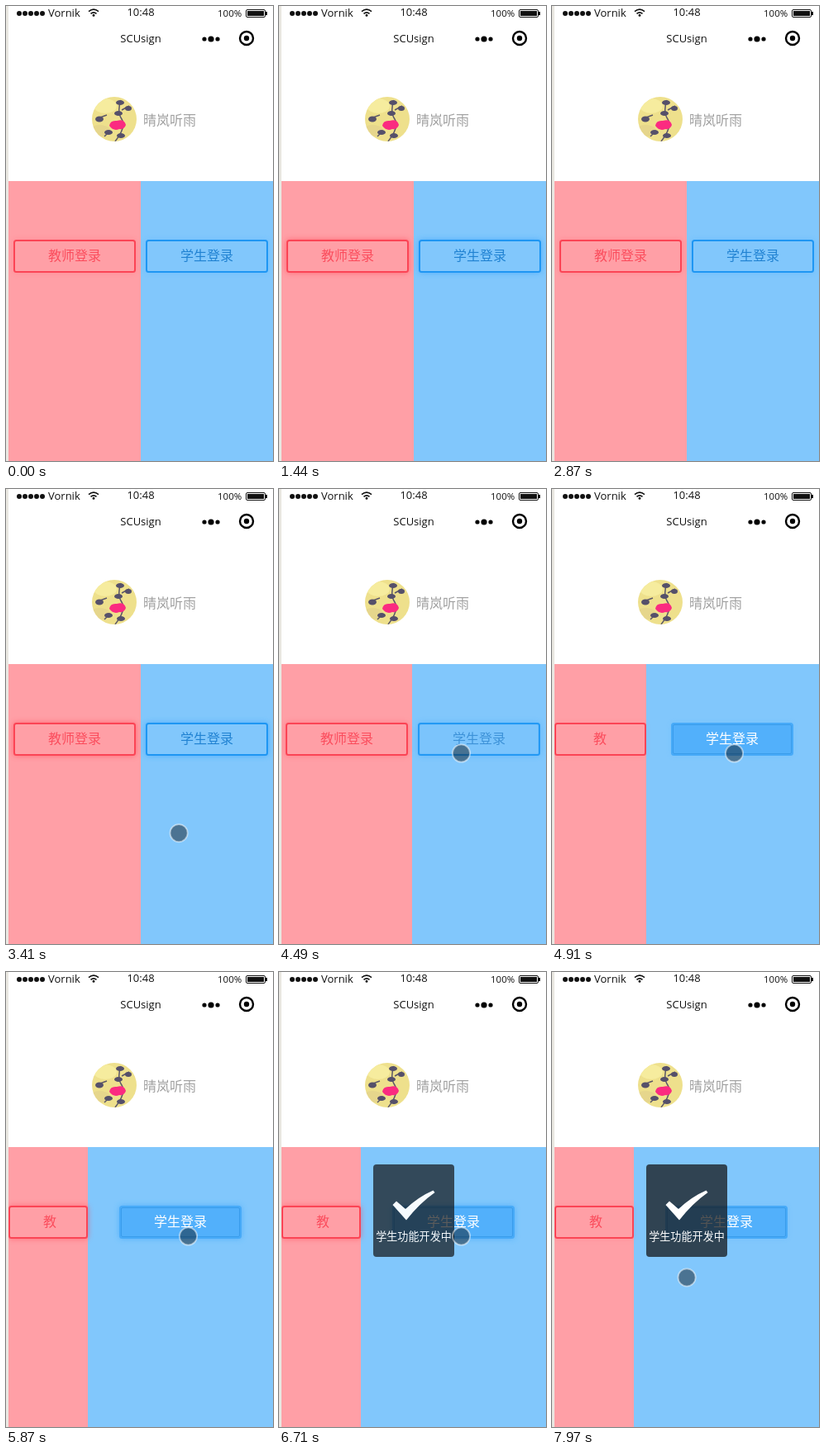
These frames come from a looping animation (323x551 px, 8 s). An HTML page:

```html
<!DOCTYPE html>
<html lang="zh">
<head>
<meta charset="utf-8">
<title>SCUsign</title>
<style>
  html, body { margin: 0; width: 100%; height: 100%; overflow: hidden; background: #fff; }
  svg { display: block; width: 323px; height: 551px; }
  text { font-family: "Open Sans", "Noto Sans CJK SC", "Noto Sans CJK", sans-serif; fill: #111; }
  .cjk { font-family: "Noto Sans CJK SC", "Noto Sans CJK", sans-serif; font-weight: 300; }
  .label { font-size: 16px; text-anchor: middle; }
</style>
</head>
<body>
<svg viewBox="0 0 323 551">
  <defs>
    <filter id="blur" x="-20%" y="-60%" width="140%" height="220%"><feGaussianBlur stdDeviation="3.6"/></filter>
    <clipPath id="round"><circle cx="131" cy="137" r="27"/></clipPath>
  </defs>
  <rect width="323" height="551" fill="#fff"/>

  <g id="status">
    <g id="signal" fill="#111"></g>
    <text x="51" y="12.5" font-size="13">Vornik</text>
    <g fill="none" stroke="#111" stroke-width="1.6">
      <path d="M100 6.7Q106 1.7 112 6.7M102.5 9.3Q106 6.3 109.5 9.3"/>
      <circle cx="106" cy="11.3" r=".7"/>
    </g>
    <text x="163" y="12" font-size="13" text-anchor="middle">10:48</text>
    <text x="256" y="13" font-size="11.5">100%</text>
    <rect x="290.5" y="4.5" width="23" height="9" rx="1.5" fill="none" stroke="#111"/>
    <rect x="292" y="6" width="20" height="6" fill="#111"/>
    <rect x="314" y="7" width="2" height="4" fill="#111"/>
  </g>

  <text x="163" y="44" font-size="13" text-anchor="middle">SCUsign</text>
  <circle cx="240" cy="40" r="2.6"/>
  <circle cx="248" cy="40" r="3.6"/>
  <circle cx="256" cy="40" r="2.6"/>
  <circle cx="291" cy="39" r="8" fill="none" stroke="#000" stroke-width="2.4"/>
  <circle cx="291" cy="39" r="3.2"/>

  <g clip-path="url(#round)">
    <rect x="104" y="110" width="54" height="54" fill="#eee08c"/>
    <ellipse cx="120" cy="121" rx="14" ry="9" fill="#f6ec9e"/>
    <ellipse cx="113" cy="151" rx="13" ry="7" fill="#e6d68c"/>
    <path d="M139 114Q134 128 140 137T132 164M140 126L149 121M122 132L111 136M126 151L119 158" fill="none" stroke="#5d5868" stroke-width="1.5"/>
    <g fill="#55506a">
      <ellipse cx="138" cy="117" rx="5" ry="3"/>
      <ellipse cx="148" cy="124" rx="4" ry="3"/>
      <ellipse cx="113" cy="137" rx="5" ry="3.5"/>
      <ellipse cx="136" cy="130" rx="5" ry="3"/>
      <ellipse cx="124" cy="153" rx="5" ry="3"/>
      <ellipse cx="139" cy="157" rx="5" ry="3"/>
    </g>
    <path d="M125 145Q126 138 134 139Q143 136 145 144Q143 150 137 149Q130 152 125 145Z" fill="#fb2b80"/>
  </g>
  <text class="cjk" x="166" y="143.5" font-size="16" style="fill:#a0a0a0">晴岚听雨</text>

  <rect x="3" y="212" width="320" height="339" fill="#ff9fa6"/>
  <rect id="rightColumn" y="212" height="339" fill="#81c7fc"/>
  <g id="buttons"></g>
  <rect width="3" height="551" fill="#e9e7e1"/>

  <g id="toast">
    <rect x="114" y="233" width="98" height="112" rx="4" fill="#111" fill-opacity=".72"/>
    <path d="M137.5 282L142 277.5L153 287Q169 272 186.5 264.5L188.5 267Q170 280 154 300.5Z" fill="#fff"/>
    <text class="cjk" x="163" y="325" font-size="13.1" text-anchor="middle" style="fill:#fff">学生功能开发中</text>
  </g>
  <circle id="cursor" r="10.6" fill="#000" fill-opacity=".42" stroke="#fff" stroke-opacity=".5" stroke-width="1.8"/>
</svg>

<script>
const LOOP = 8000, LEFT = 3, RIGHT = 323, PADDING = 42, LETTER = 16;
const PINK = [255, 159, 166], SKY = [129, 199, 252];
const byId = id => document.getElementById(id);
const clamp = x => Math.min(1, Math.max(0, x));
const mix = (a, b, p) => a + (b - a) * p;
const mixColor = (a, b, p) => `rgb(${a.map((v, i) => Math.round(mix(v, b[i], p)))})`;

function add(parent, tag, attrs) {
  const node = document.createElementNS('http://www.w3.org/2000/svg', tag);
  set(node, attrs);
  return parent.appendChild(node);
}
function set(node, attrs) {
  for (const key in attrs) node.setAttribute(key, attrs[key]);
}

// CSS "ease": cubic-bezier(.25, .1, .25, 1)
function ease(x) {
  x = clamp(x);
  let lo = 0, hi = 1;
  const curve = (s, a, b) => 3 * a * s * (1 - s) ** 2 + 3 * b * s * s * (1 - s) + s ** 3;
  for (let i = 0; i < 24; i++) {
    const mid = (lo + hi) / 2;
    if (curve(mid, .25, .25) < x) lo = mid; else hi = mid;
  }
  return curve(lo, .1, 1);
}
const progress = (t, start, length) => ease((t - start) / length);

// The frame is filled so that the glow shows only around it.
function makeButton(label, glowColor) {
  const group = add(byId('buttons'), 'g', {});
  return {
    label,
    glow: add(group, 'rect', { y: 283, height: 40, rx: 3, fill: glowColor, filter: 'url(#blur)' }),
    frame: add(group, 'rect', { y: 284, height: 38, rx: 2.5, 'stroke-width': 2 }),
    line: add(group, 'rect', { y: 285.5, height: 35, rx: 1.5, fill: 'none', stroke: '#399ceb', opacity: 0 }),
    text: add(group, 'text', { class: 'cjk label', y: 308 }),
  };
}

const teacher = makeButton('教师登录', '#ff4555');
const student = makeButton('学生登录', '#2b9df8');
for (let i = 0; i < 5; i++) add(byId('signal'), 'circle', { cx: 16 + 7 * i, cy: 9, r: 3 });

// Buttons shrink with their column; the label wraps and only its first line shows.
function placeButton(button, from, to) {
  const width = Math.min(148, to - from);
  const center = Math.floor((from + to) / 2);
  const x = width < 148 ? from : center - width / 2;
  const letters = Math.max(1, Math.min(4, Math.floor((width - 2 * PADDING) / LETTER)));
  set(button.glow, { x, width });
  set(button.frame, { x: x + 1, width: width - 2 });
  set(button.line, { x: x + 2.5, width: width - 5 });
  set(button.text, { x: Math.max(center, x + PADDING + letters * LETTER / 2) });
  const shown = button.label.slice(0, letters);
  if (button.text.textContent !== shown) button.text.textContent = shown;
}

const glowSteps = [
  [0, .3], [60, .4], [240, .9], [1610, .65], [2030, .2], [2870, .35],
  [3050, .9], [4490, .55], [4850, .15], [5690, .3], [5870, .8], [7370, .5], [7790, .2],
];
const glowAt = t => glowSteps.filter(([time]) => time <= t).pop()[1];

// start, end, from, to
const moves = [
  [3020, 3490, [178, 545], [210, 413]],
  [3660, 3950, [210, 413], [220.5, 320]],
  [7740, 7980, [220.5, 320], [163, 370]],
];
function cursorAt(t) {
  const [start, end, from, to] = moves.filter(move => move[0] <= t).pop() || moves[0];
  const p = 1 - (1 - clamp((t - start) / (end - start))) ** 2;
  return from.map((v, i) => mix(v, to[i], p));
}

function render(t) {
  const split = Math.floor(LEFT + mix(160, 96, progress(t, 4450, 1000)));
  const hover = progress(t, 4440, 420);
  const glow = glowAt(t);

  set(byId('rightColumn'), { x: split, width: RIGHT - split });
  placeButton(teacher, LEFT, split);
  placeButton(student, split, RIGHT);

  set(teacher.frame, { stroke: '#fb4455', fill: mixColor(PINK, PINK, 0) });
  teacher.text.style.fill = '#fb4d5d';
  set(teacher.glow, { opacity: glow * .7 });

  set(student.frame, {
    stroke: mixColor([30, 150, 243], [71, 170, 248], hover),
    fill: mixColor(SKY, [82, 176, 251], hover),
  });
  set(student.line, { opacity: hover });
  student.text.style.fill = mixColor([32, 130, 210], [255, 255, 255], hover);
  set(student.glow, { opacity: glow * .65 });

  set(byId('toast'), { opacity: progress(t, 6420, 400) });
  const [cx, cy] = cursorAt(t);
  set(byId('cursor'), { cx, cy, visibility: t < 3050 ? 'hidden' : 'visible' });
}

const begin = performance.now();
function tick() {
  render((performance.now() - begin) % LOOP);
  requestAnimationFrame(tick);
}
render(0);
requestAnimationFrame(tick);
</script>
</body>
</html>
```
